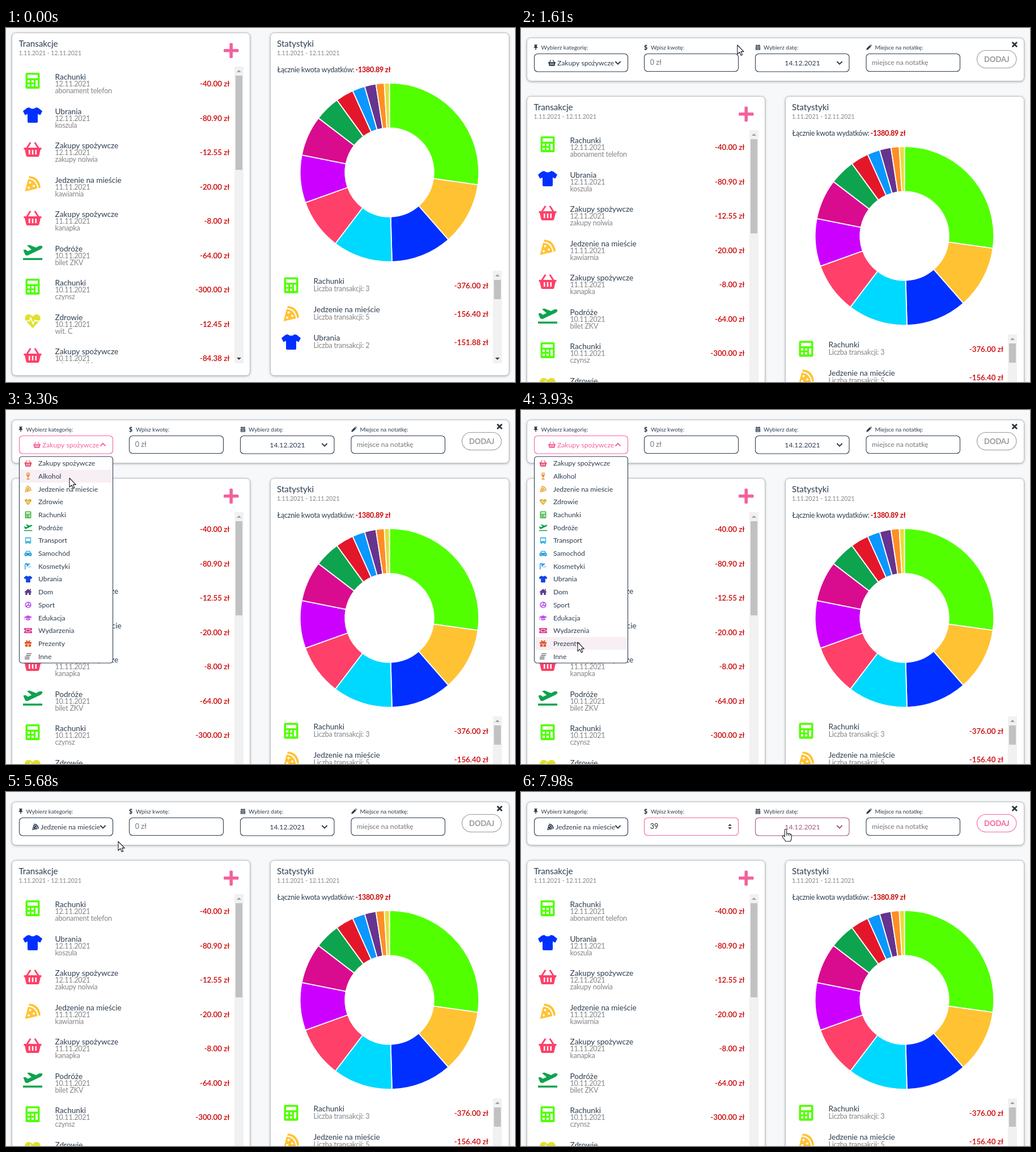
Write an HTML page with a canvas that moves like this. It is 898 px wide and 624 px high and loops after 8 s.

```html
<!DOCTYPE html>
<html lang="pl">
<head>
<meta charset="utf-8">
<style>
  html, body { margin: 0; width: 100%; height: 100%; overflow: hidden; background: #f6f8fa; }
  canvas { display: block; }
</style>
</head>
<body>
<canvas id="stage" width="898" height="624"></canvas>
<script>
const ctx = document.getElementById('stage').getContext('2d');
const LOOP = 8000, SHIFT = 112;
const INK = [44, 62, 80], PINK = [248, 98, 159], RED = [204, 0, 0], GREY = [153, 153, 153];
const INK_CSS = '#2c3e50', MUTED = '#858585', AMOUNT = '#c00';

const clamp = v => Math.max(0, Math.min(1, v));
const ramp = (t, from, to) => clamp((t - from) / (to - from));
const mix = (a, b, k) => `rgb(${a.map((v, i) => Math.round(v + (b[i] - v) * k))})`;
const within = (t, from, to) => t >= from && t < to;

// Icon outlines around (0,0), about 28 units high, filled even-odd
const icons = {
  bills: 'M-10-14H10Q12.5-14 12.5-11.5V11.5Q12.5 14 10 14H-10Q-12.5 14-12.5 11.5V-11.5Q-12.5-14-10-14ZM-9-10.5H9V-4.5H-9ZM-9-1h4v4h-4ZM-2-1h4v4h-4ZM-9 6h4v4h-4ZM-2 6h4v4h-4ZM5-1h4v11h-4Z',
  clothes: 'M-6-13.5Q0-8.5 6-13.5L10-12.5 17-7 13.5 0 9-2V11.5Q9 13.5 7 13.5H-7Q-9 13.5-9 11.5V-2L-13.5 0-17-7-10-12.5Z',
  basket: 'M-15.5-3H15.5V0H14L11.5 11Q11 13 9 13H-9Q-11 13-11.5 11L-14 0H-15.5ZM-11.5-3L-5-13-2.5-11.5-8-3ZM11.5-3L5-13 2.5-11.5 8-3ZM-7 1h2.5v8h-2.5ZM-1.2 1h2.5v8h-2.5ZM4.5 1h2.5v8h-2.5Z',
  pizza: 'M-6-13.5Q12-12 14 7L10.5 8Q8-9-7-10ZM-8-8Q6-7 8.5 8.5L-13.5 13.5ZM-4.5-4a2 2 0 1 0 .1 0ZM2 2a2 2 0 1 0 .1 0ZM-7 5a2 2 0 1 0 .1 0Z',
  travel: 'M-17 10H17V13.5H-17ZM-16.5-4L-12.5-5-8.5-2-2-5-10-12-5.5-13 6-8.5 12-11.5Q17-12.5 17.5-9.5 16-6 11-4L-9 5.5Q-12 6-13.5 3.5Z',
  health: 'M0 12.5L-12 0Q-16-6-11-10.5-5.5-14 0-8 5.5-14 11-10.5 16-6 12 0ZM-12-1H-6.5L-3.5-8 1 3 4-3 5.5-1H12V1H4.5L4 0 1 7.5-3.5-3-5.5 1H-11Z',
  glass: 'M-7-14H7L6-3Q4 2 1.5 3V10H6V13.5H-6V10H-1.5V3Q-4 2-6-3ZM-4.5-11H4.5L4.2-7H-4.2Z',
  bus: 'M-12-13H12V10H9V13.5H5V10H-5V13.5H-9V10H-12ZM-9-9H9V2H-9ZM-8 5h3v2.5h-3ZM5 5h3v2.5h-3Z',
  car: 'M-8-10H8L11-3 15 0V9H11V12H7V9H-7V12H-11V9H-15V0L-11-3ZM-6-7H6L8-2.5H-8ZM-11 2h4v3h-4ZM7 2h4v3h-4Z',
  shower: 'M-14 13V-8Q-12-14-5-13L0-10 5-13 8-10-4 2-7-1-5-6Q-10-10-10.5-7V13ZM6-3h3v3h-3ZM2 2h3v3h-3ZM9 1h3v3h-3Z',
  home: 'M0-13L15 0 13 2 11 .5V12H3V4H-3V12H-11V.5L-13 2-15 0ZM7-13H11V-5L7-8Z',
  ball: 'M0-13a13 13 0 1 0 .1 0ZM-1-10V-1L-9 4-10 0Q-8-8-1-10ZM2-9Q9-6 10 2L2-2ZM0 2L8 6Q2 12-6 8Z',
  school: 'M0-10L17-3 0 4-17-3ZM-9 2.5L0 6.5 9 2.5V8Q0 13-9 8ZM-15-1h2V8h-2Z',
  ticket: 'M-16-10H16V-4Q12-3 12 0 12 3 16 4V10H-16V4Q-12 3-12 0-12-3-16-4ZM-9-6H9V6H-9ZM-7-4H7V4H-7Z',
  gift: 'M-14-6H-6Q-12-13-6-13-2-13 0-7 2-13 6-13 12-13 6-6H14V1H-14ZM-12 3H-1.5V13H-12ZM1.5 3H12V13H1.5Z',
  coins: 'M-6-13H14V-9H-6ZM-9-6H11V-2H-9ZM-14 1H6V5H-14ZM-14 8H6V12H-14Z',
  pin: 'M-8-14H8V-10H5L6-3Q10 0 10 4H2V13H-2V4H-10Q-10 0-6-3L-5-10H-8Z',
  calendar: 'M-12-10H-8V-14H-4V-10H4V-14H8V-10H12V-5H-12ZM-12-3H12V14H-12ZM-8 0h4v4h-4ZM-2 0h4v4h-4ZM4 0h4v4h-4ZM-8 7h4v4h-4ZM-2 7h4v4h-4ZM4 7h4v4h-4Z',
  pen: 'M-14 14L-12 5 4-11 11-4-5 12ZM6-13L9-15 15-9 13-6Z'
};
for (const key in icons) icons[key] = new Path2D(icons[key]);

const pointers = {
  arrow: new Path2D('M0 0V16L3.8 12.5 6.3 18.3 8.8 17.2 6.4 11.6H11.3Z'),
  hand: new Path2D('M-1 21.5L-6.8 13.5Q-7 11-4.8 11.3L-2.7 13V1.5Q-2.7 0-1 0 .7 0 .7 1.5V8Q2.5 6.8 3.8 8.3 5.8 7.3 6.8 9 9.3 8.5 9.3 11V15Q9.3 18 7.3 21.5Z')
};

const transactions = [
  ['bills', '#51ff00', 'Rachunki', '12.11.2021', 'abonament telefon', '-40.00'],
  ['clothes', '#0030ff', 'Ubrania', '12.11.2021', 'koszula', '-80.90'],
  ['basket', '#ff4069', 'Zakupy spożywcze', '12.11.2021', 'zakupy nolwia', '-12.55'],
  ['pizza', '#ffc233', 'Jedzenie na mieście', '11.11.2021', 'kawiarnia', '-20.00'],
  ['basket', '#ff4069', 'Zakupy spożywcze', '11.11.2021', 'kanapka', '-8.00'],
  ['travel', '#0ea34f', 'Podróże', '10.11.2021', 'bilet ZKV', '-64.00'],
  ['bills', '#51ff00', 'Rachunki', '10.11.2021', 'czynsz', '-300.00'],
  ['health', '#e0e030', 'Zdrowie', '10.11.2021', 'wit. C', '-12.45'],
  ['basket', '#ff4069', 'Zakupy spożywcze', '10.11.2021', 'zakupy bułki', '-84.38']
];
const summary = [
  ['bills', '#51ff00', 'Rachunki', 3, '-376.00'],
  ['pizza', '#ffc233', 'Jedzenie na mieście', 5, '-156.40'],
  ['clothes', '#0030ff', 'Ubrania', 2, '-151.88']
];
// Slice colour and the clockwise angle where it ends
const slices = [
  ['#51ff00', 98], ['#ffc233', 138.8], ['#002fff', 178.4], ['#00d9ff', 217.3], ['#ff4069', 250.2],
  ['#cc00ff', 281.2], ['#d90b8e', 307.4], ['#0ea34f', 324], ['#e4172a', 335.7], ['#0a97ff', 343.9],
  ['#66338f', 351.3], ['#ff8e24', 356.7], ['#e8dc3c', 360]
];
const categories = [
  ['basket', '#e8476a', 'Zakupy spożywcze'], ['glass', '#e58a2e', 'Alkohol'],
  ['pizza', '#e8a83a', 'Jedzenie na mieście'], ['health', '#e0ac28', 'Zdrowie'],
  ['bills', '#2fae2f', 'Rachunki'], ['travel', '#0ea34f', 'Podróże'],
  ['bus', '#2aaee0', 'Transport'], ['car', '#2a9fd8', 'Samochód'],
  ['shower', '#2a9be0', 'Kosmetyki'], ['clothes', '#1546e0', 'Ubrania'],
  ['home', '#5e3b8c', 'Dom'], ['ball', '#b84af0', 'Sport'],
  ['school', '#c64ae8', 'Edukacja'], ['ticket', '#d92a86', 'Wydarzenia'],
  ['gift', '#e0582e', 'Prezenty'], ['coins', '#777777', 'Inne']
];

function text(str, x, y, size, color, { weight = 400, align = 'left', spacing = 0 } = {}) {
  ctx.font = `${weight} ${size}px Lato, sans-serif`;
  ctx.letterSpacing = spacing + 'px';
  ctx.textAlign = align;
  ctx.fillStyle = color;
  ctx.fillText(str, x, y);
}
const small = (str, x, y, color = MUTED, weight = 400) => text(str, x, y, 12.5, color, { weight, spacing: -0.2 });
const amount = (str, x, y) => text(str + ' zł', x, y, 13.3, AMOUNT, { weight: 600, align: 'right' });

function icon(name, x, y, color, scale = 1) {
  ctx.save();
  ctx.translate(x, y);
  ctx.scale(scale, scale);
  ctx.fillStyle = color;
  ctx.fill(icons[name], 'evenodd');
  ctx.restore();
}

function box(x, y, w, h, r, stroke, width = 1.1) {
  ctx.beginPath();
  ctx.roundRect(x, y, w, h, r);
  ctx.fillStyle = '#fff';
  ctx.fill();
  ctx.shadowColor = 'transparent';
  ctx.strokeStyle = stroke;
  ctx.lineWidth = width;
  ctx.stroke();
}

function card(x, y, w, h) {
  ctx.save();
  ctx.shadowColor = 'rgba(0,0,0,.35)';
  ctx.shadowBlur = 4;
  ctx.shadowOffsetY = 1;
  box(x, y, w, h, 7, '#bcc0c6', 1);
  ctx.restore();
}

function line(points, color, width) {
  ctx.beginPath();
  points.forEach(([x, y]) => ctx.lineTo(x, y));
  ctx.strokeStyle = color;
  ctx.lineWidth = width;
  ctx.stroke();
}

function triangle(x, y, w, h, color) {
  ctx.beginPath();
  ctx.moveTo(x - w, y + h / 2);
  ctx.lineTo(x + w, y + h / 2);
  ctx.lineTo(x, y - h / 2);
  ctx.fillStyle = color;
  ctx.fill();
}

function chevron(x, y, color, up = false) {
  const d = up ? -2.3 : 2.3;
  line([[x - 4.6, y - d], [x, y + d], [x + 4.6, y - d]], color, 2);
}

function scrollbar(x, top, bottom, thumb) {
  ctx.fillStyle = '#f1f1f1';
  ctx.fillRect(x, top, 16, bottom - top);
  ctx.fillStyle = '#c1c1c1';
  ctx.fillRect(x + 2, top + 16, 12, thumb);
  triangle(x + 8, top + 8, 4, 4, '#a0a0a0');
  triangle(x + 8, bottom - 8, 4, -4, '#404040');
}

function clipped(x, y, w, h, draw) {
  ctx.save();
  ctx.beginPath();
  ctx.rect(x, y, w, h);
  ctx.clip();
  draw();
  ctx.restore();
}

function cardTitle(title, x) {
  text(title, x, 33, 15.2, INK_CSS);
  text('1.11.2021 - 12.11.2021', x, 48, 10.5, MUTED);
}

function transactionsCard(t) {
  card(10.5, 8.5, 420, 604);
  cardTitle('Transakcje', 22.5);
  const hover = t < 1400 ? ramp(t, 1050, 1220) : 1 - ramp(t, 1400, 1600);
  ctx.beginPath();
  ctx.roundRect(384, 37, 26.5, 5.6, 1.5);
  ctx.roundRect(394.4, 26.5, 5.6, 26.5, 1.5);
  ctx.fillStyle = mix([242, 98, 159], RED, hover);
  ctx.fill();
  const tint = 0.45 * ramp(t, 800, 1000) * (1 - ramp(t, 1450, 1600));
  clipped(12, 68, 391, 523, () => transactions.forEach(([shape, color, name, date, note, sum], i) => {
    const y = 60.5 * i;
    icon(shape, 47, 93 + y, color);
    text(name, 86.5, 91 + y, 13.6, i ? INK_CSS : mix(INK, [170, 20, 20], tint));
    small(date, 86.5, 103 + y);
    small(note, 86.5, 115.3 + y);
    amount(sum, 394.5, 103 + y);
  }));
  scrollbar(403, 68, 591, 166);
}

function donut(cx, cy, outer, inner) {
  let start = -Math.PI / 2;
  for (const [color, degrees] of slices) {
    const end = (degrees - 90) * Math.PI / 180;
    ctx.beginPath();
    ctx.arc(cx, cy, outer, start, end);
    ctx.arc(cx, cy, inner, end, start, true);
    ctx.closePath();
    ctx.fillStyle = color;
    ctx.fill();
    ctx.strokeStyle = '#fff';
    ctx.lineWidth = 1.8;
    ctx.stroke();
    start = end;
  }
}

function statsCard() {
  card(466.5, 8.5, 421, 604);
  cardTitle('Statystyki', 478);
  small('Łącznie kwota wydatków:', 478.5, 78.3, INK_CSS);
  small('-1380.89 zł', 616.5, 78.3, AMOUNT, 700);
  donut(676.5, 254.5, 157.7, 78.3);
  clipped(470, 428, 389, 163, () => summary.forEach(([shape, color, name, count, sum], i) => {
    const y = 50 * i;
    icon(shape, 503, 453.5 + y, color);
    text(name, 542.5, 451.3 + y, 13.6, INK_CSS);
    small('Liczba transakcji: ' + count, 542.5, 464 + y);
    amount(sum, 851, 458.5 + y);
  }));
  scrollbar(859, 428, 591, 34);
}

function form(t, open) {
  card(10.5, 17.5, 877, 76);
  [['pin', 26, 'Wybierz kategorię:', 35.5], [null, 220, 'Wpisz kwotę:', 229],
   ['calendar', 418, 'Wybierz datę:', 428], ['pen', 614, 'Miejsce na notatkę:', 624.5]].forEach(([shape, x, label, labelX]) => {
    if (shape) icon(shape, x, 34, INK_CSS, 0.34);
    else text('$', x, 37.8, 10.5, INK_CSS, { weight: 900, align: 'center' });
    text(label, labelX, 37.6, 10, INK_CSS);
  });

  const chosen = t >= 5350;
  const catColor = mix(INK, PINK, chosen ? 1 - ramp(t, 5350, 5600) : ramp(t, 2420, 2650));
  box(23.5, 45.5, 165, 31.5, 6, catColor);
  icon(chosen ? 'pizza' : 'basket', chosen ? 52 : 54.5, 61.5, catColor, 0.43);
  text(chosen ? 'Jedzenie na mieście' : 'Zakupy spożywcze', chosen ? 61 : 64, 66, 12.2, catColor);
  chevron(171, 61.3, catColor, open);

  const focused = t >= 5930;
  box(217.5, 45.5, 166, 31, 6, mix(INK, PINK, ramp(t, 5930, 6080)));
  const typed = t >= 7200 ? '39' : t >= 6930 ? '3' : '';
  text(typed || '0 zł', 227.8, 65, 12.5, typed ? '#222' : '#757575');
  if (focused) {
    triangle(368.5, 58, 3.2, 3.6, '#333');
    triangle(368.5, 64, 3.2, -3.6, '#333');
    const caretOn = within(t, 5960, 6490) || within(t, 6930, 7720);
    ctx.fillStyle = '#000';
    if (caretOn) ctx.fillRect(228 + 7.25 * typed.length, 54, 1, 14);
  }

  const dateColor = mix(INK, PINK, ramp(t, 7840, 8070));
  box(413.5, 45.5, 165.5, 31.5, 6, dateColor);
  text('14.12.2021', 496.5, 66, 12.2, dateColor, { align: 'center' });
  chevron(562, 61.3, dateColor);

  box(609, 45.5, 165.5, 31, 6, INK_CSS);
  text('miejsce na notatkę', 619, 64.5, 12.2, '#757575');

  const buttonColor = mix(GREY, PINK, ramp(t, 6920, 7220));
  box(804.5, 39.5, 69.5, 31, 15.5, buttonColor);
  text('DODAJ', 839.3, 59.8, 13, buttonColor, { weight: 700, align: 'center' });
  line([[866.7, 25], [875, 33.3]], '#2c3444', 2.7);
  line([[875, 25], [866.7, 33.3]], '#2c3444', 2.7);
}

function dropdown(pointer) {
  const pitch = 22.68, top = 82.7;
  const hovered = Math.floor((pointer.y - top) / pitch);
  box(23.5, 82, 165, 364, 5, INK_CSS);
  categories.forEach(([shape, color, name], i) => {
    const y = top + pitch * (i + 0.5);
    if (i === hovered) {
      ctx.fillStyle = '#f7eff4';
      ctx.fillRect(24, y - pitch / 2, 163.8, pitch);
    }
    icon(shape, 39, y, color, 0.43);
    text(name, 57, y + 4.3, 12.2, INK_CSS);
  });
}

// Time, x, y of the pointer's stops
const path = [
  [500, 30, 219], [1130, 403, 30], [1500, 403, 30], [2070, 188, 30], [2500, 156, 57], [3040, 156, 57],
  [3300, 112, 120], [3800, 100, 398], [4050, 100, 419], [4610, 103, 138], [5350, 103, 138],
  [5900, 249, 60], [7715, 249, 60], [7980, 468, 65.5], [8000, 468, 65.5]
];

function pointerAt(t) {
  const i = Math.max(1, path.findIndex(stop => stop[0] > t));
  const [t0, x0, y0] = path[i - 1], [t1, x1, y1] = path[i];
  const k = ramp(t, t0, t1), s = k * k * (3 - 2 * k);
  return { x: x0 + (x1 - x0) * s, y: y0 + (y1 - y0) * s };
}

function drawPointer(t, { x, y }) {
  if (t < 500) return;
  const pressed = [[1265, 1450], [2690, 2830], [5280, 5400], [5900, 6020]].some(([a, b]) => within(t, a, b));
  if (pressed) {
    ctx.beginPath();
    ctx.arc(x, y, 14.5, 0, 7);
    ctx.fillStyle = 'rgba(255,236,0,.55)';
    ctx.fill();
  }
  if (within(t, 5760, 7790)) {
    for (const side of [-1, 1]) line([[x + 3.5 * side, y - 7.5], [x, y - 6.5], [x, y + 6.5], [x + 3.5 * side, y + 7.5]], '#222', 1.2);
    return;
  }
  const hand = within(t, 2330, 3130) || within(t, 4670, 5430) || t >= 7870;
  const shape = pointers[hand ? 'hand' : 'arrow'];
  ctx.save();
  ctx.translate(x, y);
  ctx.fillStyle = '#fff';
  ctx.fill(shape);
  ctx.strokeStyle = '#1c1c28';
  ctx.lineWidth = 1.1;
  ctx.lineJoin = 'round';
  ctx.stroke(shape);
  if (hand) [0.7, 3.8, 6.8].forEach(fx => line([[fx, 8.5], [fx, 12]], '#1c1c28', 0.9));
  ctx.restore();
}

function draw(t) {
  const formOpen = t >= 1450, listOpen = within(t, 2760, 5350);
  const pointer = pointerAt(t);
  ctx.fillStyle = '#f6f8fa';
  ctx.fillRect(0, 0, 898, 624);
  ctx.save();
  if (formOpen) ctx.translate(0, SHIFT);
  transactionsCard(t);
  statsCard();
  ctx.restore();
  if (formOpen) form(t, listOpen);
  if (listOpen) dropdown(pointer);
  drawPointer(t, pointer);
}

const started = performance.now();
function tick() {
  draw((performance.now() - started) % LOOP);
  requestAnimationFrame(tick);
}
tick();
</script>
</body>
</html>
```
